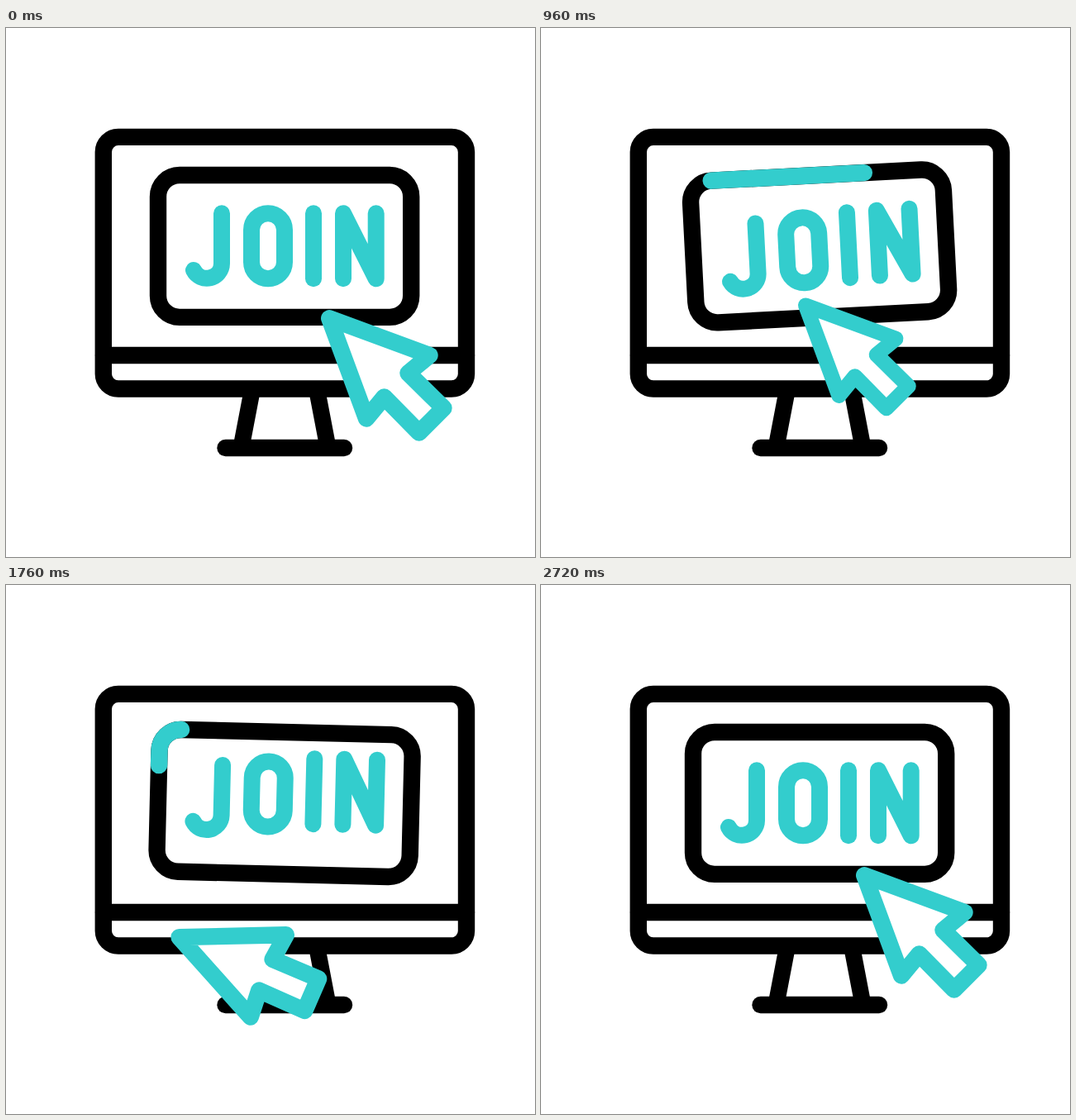
An HTML page for the animation above (3 s loop, 640 by 640 pixels).

```html
<!DOCTYPE html>
<html lang="en">
<head>
<meta charset="utf-8">
<title>Join button</title>
<style>
  html, body { margin: 0; width: 100%; height: 100%; overflow: hidden; background: #fff; }
  svg { display: block; width: 100%; height: 100%; }
  svg * { stroke-linecap: round; stroke-linejoin: round; }
  .ink, .teal { fill: none; stroke: #000; stroke-width: 20.4; }
  .teal { stroke: #33cdcd; }
  .letter { stroke-width: 20; }
  #cursor path { fill: #fff; }
</style>
</head>
<body>
<svg viewBox="0 0 640 640" role="img" aria-label="JOIN">
  <g class="ink">
    <path d="M298 437L285 505M376 437L389 505" stroke-width="20"/>
    <path d="M265.5 508H409"/>
    <rect x="117.8" y="131.9" width="439.2" height="304.6" rx="18"/>
    <path d="M118 396H557"/>
  </g>
  <g id="button">
    <path class="ink" id="frame"/>
    <path class="teal" id="trim" pathLength="100"/>
    <path class="teal letter" d="M261 224.3V285A18 18 0 0 1 227 293"/>
    <rect class="teal letter" x="297" y="224.3" width="40" height="79" rx="20"/>
    <path class="teal letter" d="M372 224.3V303.3"/>
    <path class="teal letter" d="M408 303.3V224.3L447.7 303.3V224.3"/>
  </g>
  <g id="cursor">
    <path class="teal" d="M-69.3 -69.3L52 -24.5L26 -3L69 39.3L39.3 69L-3 26L-24.5 52Z"/>
  </g>
</svg>
<script>
const LOOP = 3000;
const $ = id => document.getElementById(id);
const button = $('button'), cursor = $('cursor'), trim = $('trim');
const letters = [...document.querySelectorAll('.letter')];

// Rounded outline, clockwise from the left end of the top edge
const outline = 'M210 178H464.2a26 26 0 0 1 26 26V323.9a26 26 0 0 1 -26 26' +
  'H210a26 26 0 0 1 -26 -26V204a26 26 0 0 1 26 -26';
$('frame').setAttribute('d', outline);
trim.setAttribute('d', outline);

// Tables of [ms, value], eased between neighbours
const TILT = [[700, 0], [1100, -4.1], [1500, 5], [1900, 0]];
const HOP = [[700, 0], [1100, 11.3], [1500, -16], [1900, 0]];
const HEAD = [[700, 0], [1600, 100]];
const TAIL = [[1000, 0], [1900, 100]];
const PRESS = [[700, 1], [1000, 0.895], [1300, 1]];
const TURN = [[1000, 0], [1900, -23], [2725, 0]];
const STAGGER = 100;

// Cursor centre: [start, end, Bezier points]
const HOME = [460.5, 420.5], CLICK = [382.5, 398], LOW = [294.5, 469.5];
const ROUTE = [
  [200, 700, [HOME, CLICK]],
  [1000, 1900, [CLICK, [333, 436], LOW]],
  [1900, 2725, [LOW, [350, 470], [407.5, 474], HOME]]
];

const ease = u => u * u * (3 - 2 * u);
const progress = (t, a, b) => ease(Math.min(1, Math.max(0, (t - a) / (b - a))));

function track(keys, t) {
  let value = keys[0][1];
  for (let i = 1; i < keys.length; i++) {
    const [a, from] = keys[i - 1], [b, to] = keys[i];
    if (t > a) value = from + (to - from) * progress(t, a, b);
  }
  return value;
}

function bezier(points, s) {
  while (points.length > 1) {
    points = points.slice(1).map((p, i) => p.map((v, k) => points[i][k] + (v - points[i][k]) * s));
  }
  return points[0];
}

function place(t) {
  let at = HOME;
  for (const [a, b, points] of ROUTE) {
    if (t > a) at = bezier(points, progress(t, a, b));
  }
  return at;
}

function draw(t) {
  button.setAttribute('transform', `rotate(${track(TILT, t)} 337.1 264)`);
  letters.forEach((el, i) =>
    el.setAttribute('transform', `translate(0 ${track(HOP, t - i * STAGGER)})`));

  const tail = track(TAIL, t), length = track(HEAD, t) - tail;
  trim.style.display = length > 0.01 ? '' : 'none';
  trim.setAttribute('stroke-dasharray', `${Math.max(length, 0.01)} 200`);
  trim.setAttribute('stroke-dashoffset', -tail);

  const [x, y] = place(t);
  cursor.setAttribute('transform',
    `translate(${x} ${y}) rotate(${track(TURN, t)}) scale(${track(PRESS, t)})`);
}

const start = performance.now();
function tick() {
  draw((performance.now() - start) % LOOP);
  requestAnimationFrame(tick);
}
tick();
</script>
</body>
</html>
```
